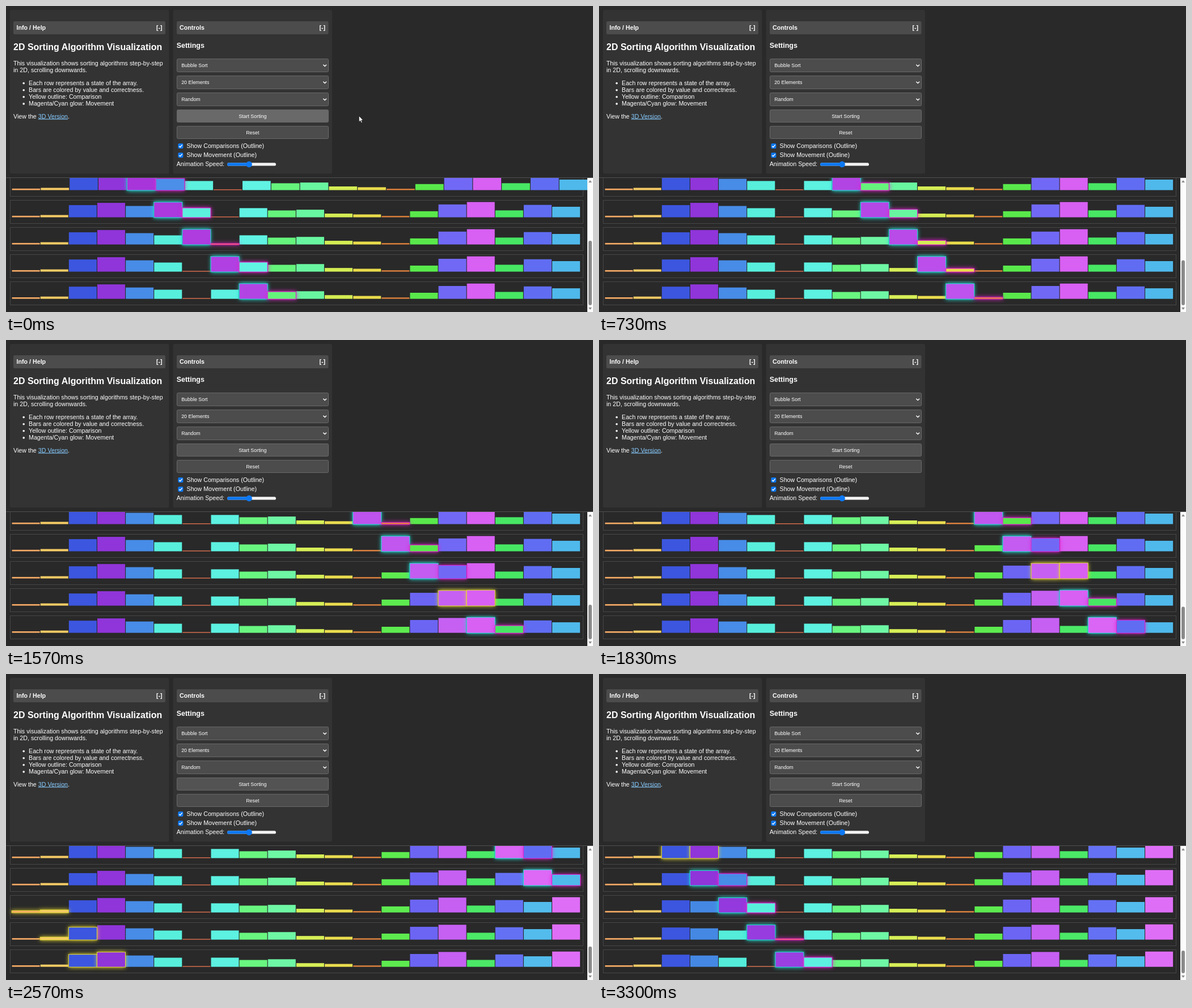
An HTML page with a canvas that plays this animation: 1035x541 px, repeating every 3.37 s.

```html
<!DOCTYPE html>
<html lang="en">
<head>
<meta charset="utf-8">
<title>2D Sorting Algorithm Visualization</title>
<style>
  html, body { margin: 0; width: 1035px; height: 541px; overflow: hidden; background: #292929; }
  svg, canvas { position: absolute; left: 0; display: block; }
  svg { top: 0; }
  canvas { top: 303px; }
  text { font: 10.7px "Liberation Sans", Arial, sans-serif; fill: #fff; }
  .bold { font-weight: bold; }
  .h2 { font-size: 16px; font-weight: bold; }
  .h3 { font-size: 12.48px; font-weight: bold; }
  .small { font-size: 8.9px; }
  .mid { text-anchor: middle; }
  .end { text-anchor: end; }
  .link { fill: #88ccff; text-decoration: underline; }
  .panel { fill: #333; }
  .head { fill: #4c4c4c; }
  .field { fill: #4c4c4c; stroke: #686868; }
  .check { fill: none; stroke: #fff; stroke-width: 1.4; }
</style>
</head>
<body>
<svg id="ui" width="1035" height="303" viewBox="0 0 1035 303">
  <rect class="panel" x="7" y="7" width="280.5" height="289.5" rx="3"/>
  <rect class="panel" x="294.5" y="7" width="280.5" height="289.5" rx="3"/>
  <rect class="head" x="13" y="27" width="268" height="23" rx="2.5"/>
  <rect class="head" x="301" y="27" width="267.5" height="23" rx="2.5"/>

  <text class="bold" x="18.5" y="42">Info / Help</text>
  <text class="bold end" x="275.7" y="42">[-]</text>
  <text class="h2" x="13" y="78.2">2D Sorting Algorithm Visualization</text>
  <text x="13" y="104.8">This visualization shows sorting algorithms step-by-step</text>
  <text x="13" y="117">in 2D, scrolling downwards.</text>
  <g id="list"></g>
  <text x="13" y="198.5">View the <tspan class="link">3D Version</tspan>.</text>

  <text class="bold" x="306" y="42">Controls</text>
  <text class="bold end" x="563.2" y="42">[-]</text>
  <text class="h3" x="300.7" y="74">Settings</text>
  <g id="selects"></g>
  <rect id="start" class="field" x="301.5" y="183.5" width="267" height="22" rx="2"/>
  <text class="small mid" x="434.8" y="198.2">Start Sorting</text>
  <rect class="field" x="301.5" y="212.5" width="267" height="22" rx="2"/>
  <text class="small mid" x="434.8" y="226.7">Reset</text>
  <g id="checks"></g>

  <text x="300.7" y="282.7">Animation Speed:</text>
  <rect x="390" y="277.2" width="86" height="5.4" rx="2.7" fill="#f2f2f2"/>
  <rect x="390" y="277.2" width="40" height="5.4" rx="2.7" fill="#0d78f2"/>
  <circle cx="428.6" cy="279.9" r="5.3" fill="#0d78f2"/>

  <path id="cursor" d="M622.3 194.2V205l2.5-2.3 1.8 3.8 1.7-.8-1.7-3.7h3.1z"
        fill="#fff" stroke="#111" stroke-width=".7"/>
</svg>
<canvas id="rows" width="1035" height="238"></canvas>

<script>
const LOOP = 3370, STEP = 200, FIRST_STEP = 70, HOVER_END = 30;
const START_ROW = 8, VISIBLE = 5, PITCH = 48.1;
const MAX = 28;
const GLOW = { compare: "#e6da32", mover: "#22e0d6", moved: "#e41fd0" };

const byId = id => document.getElementById(id);
const ctx = byId("rows").getContext("2d");

function buildControls() {
  byId("list").innerHTML = [
    "Each row represents a state of the array.",
    "Bars are colored by value and correctness.",
    "Yellow outline: Comparison",
    "Magenta/Cyan glow: Movement"
  ].map((label, i) => {
    const y = 139.8 + 12.1 * i;
    return `<circle cx="31.2" cy="${y - 3.2}" r="1.8" fill="#fff"/><text x="40" y="${y}">${label}</text>`;
  }).join("");

  byId("selects").innerHTML = ["Bubble Sort", "20 Elements", "Random"].map((label, i) => {
    const y = 93.5 + 30 * i;
    return `<rect class="field" x="301.5" y="${y}" width="267" height="23" rx="2"/>
      <text class="small" x="309.2" y="${y + 14.8}">${label}</text>
      <path class="check" d="M559.3 ${y + 10.2}l2.9 2.9 2.9-2.9"/>`;
  }).join("");

  byId("checks").innerHTML = ["Show Comparisons (Outline)", "Show Movement (Outline)"].map((label, i) => {
    const y = 243 + 16.2 * i;
    return `<rect x="303.4" y="${y}" width="9" height="9" rx="1.7" fill="#0d78f2"/>
      <path class="check" d="M305.2 ${y + 4.7}l1.9 1.9 3.6-4.2"/>
      <text x="318.5" y="${y + 7.5}">${label}</text>`;
  }).join("");
}

// Every comparison of a bubble sort becomes one row, shown before its swap.
function bubbleSortRows(values) {
  const rows = [], a = [...values];
  for (let end = a.length - 1; end > 0; end--) {
    for (let j = 0; j < end; j++) {
      const swap = a[j] > a[j + 1];
      rows.push({ values: [...a], j, swap });
      if (swap) [a[j], a[j + 1]] = [a[j + 1], a[j]];
    }
  }
  return rows;
}

const values = [2.7, 4, 21.5, 25.5, 26.3, 20, 16.1, 1.3, 16.2, 12.1,
                13.4, 6.5, 5.1, 2.4, 10.7, 22.7, 27, 12.2, 21.9, 18.6];
const sorted = [...values].sort((a, b) => a - b);
const rows = bubbleSortRows(values);

function barColor(value, index) {
  const correct = 1 - Math.abs(index - sorted.indexOf(value)) / values.length;
  return `hsl(${value / MAX * 300}, ${60 + 30 * correct}%, ${46 + 24 * correct}%)`;
}

function drawRow(index, slot) {
  const { values: bars, j, swap } = rows[index];
  const top = Math.round(294.7 + PITCH * slot);
  const base = 325.5 + 48.05 * slot;
  // The first rows were laid out before the scrollbar took its space.
  const pitch = index < VISIBLE ? 50.8 : 50.13;

  ctx.strokeStyle = "#474747";
  ctx.lineWidth = 1;
  ctx.strokeRect(7.5, top + .5, 1010, 41);

  const drawBar = (i, glow) => {
    const x = 10.6 + pitch * i, h = bars[i], w = pitch - 1.1;
    if (glow) {
      ctx.shadowColor = ctx.fillStyle = glow;
      ctx.shadowBlur = 7;
      ctx.fillRect(x - 1, base - h - 1, w + 2, h + 2);
      ctx.shadowBlur = 0;
    }
    ctx.fillStyle = barColor(bars[i], i);
    ctx.fillRect(x, base - h, w, h);
  };
  bars.forEach((_, i) => drawBar(i));
  drawBar(j, swap ? GLOW.mover : GLOW.compare);
  drawBar(j + 1, swap ? GLOW.moved : GLOW.compare);
}

function triangle(y, dir) {
  ctx.beginPath();
  ctx.moveTo(1027, y + 2 * dir);
  ctx.lineTo(1033, y + 2 * dir);
  ctx.lineTo(1030, y - 2 * dir);
  ctx.fill();
}

function drawScrollbar(count) {
  ctx.fillStyle = "#fcfcfc";
  ctx.fillRect(1025, 304, 10, 237);
  ctx.fillStyle = "#8b8b8b";
  triangle(310, 1);
  triangle(535, -1);
  const h = 1047 / (count + .19);
  ctx.beginPath();
  ctx.roundRect(1027, 529 - h, 6, h, 3);
  ctx.fill();
}

function render(t) {
  const hover = t < HOVER_END;
  byId("cursor").style.display = hover ? "" : "none";
  byId("start").style.fill = hover ? "#696969" : "#535353";

  const last = START_ROW + Math.max(0, Math.floor((t - FIRST_STEP) / STEP) + 1);
  ctx.setTransform(1, 0, 0, 1, 0, -303);
  ctx.fillStyle = "#292929";
  ctx.fillRect(0, 303, 1035, 238);
  for (let slot = 0; slot < VISIBLE; slot++) drawRow(last - VISIBLE + 1 + slot, slot);
  ctx.fillStyle = "#505050";
  ctx.fillRect(0, 303, 1035, 1);
  drawScrollbar(last + 1);
}

buildControls();
const began = performance.now();
function tick() {
  render((performance.now() - began) % LOOP);
  requestAnimationFrame(tick);
}
tick();
</script>
</body>
</html>
```
